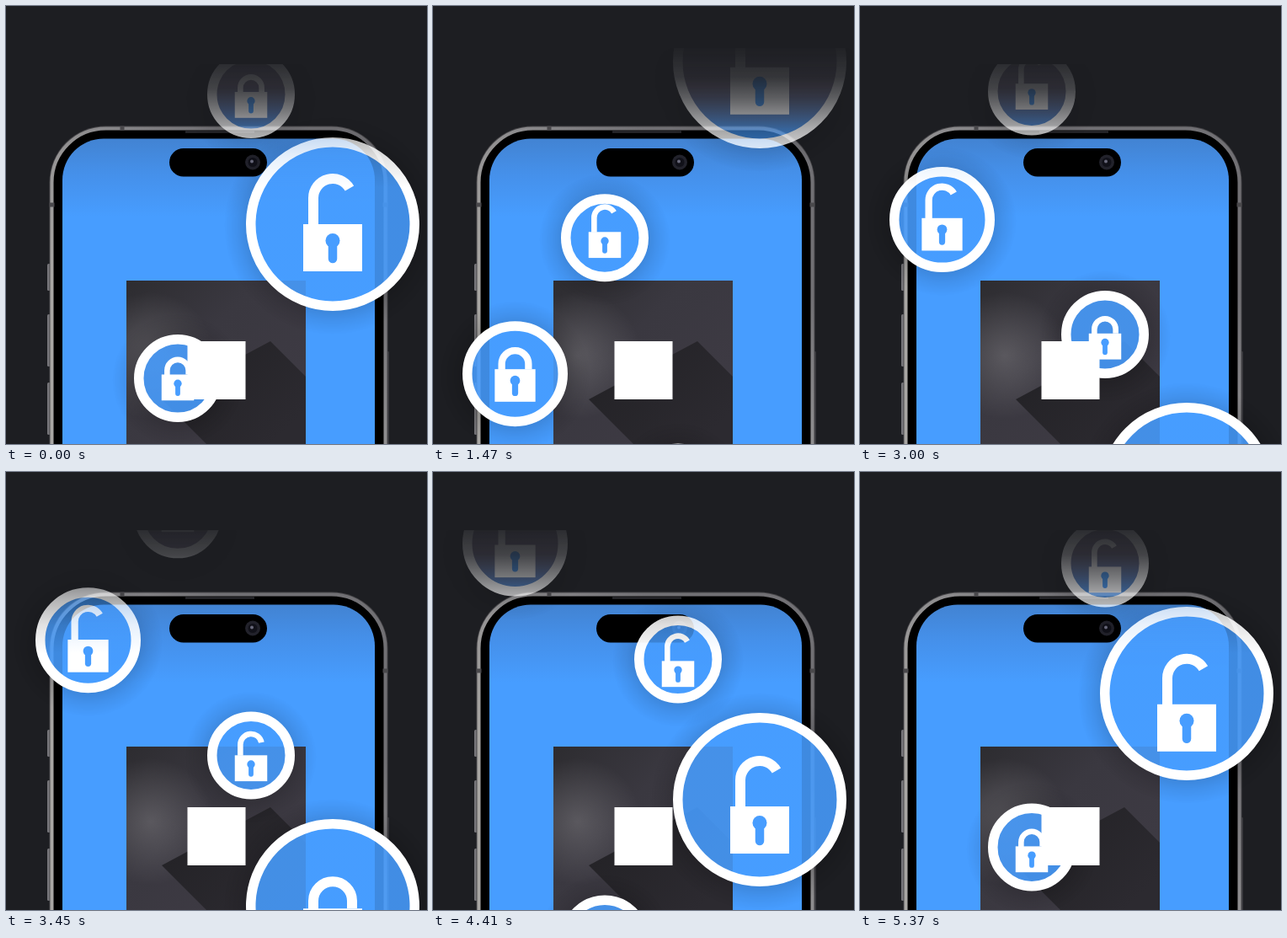
Recreate the animation shown at these times as an HTML page. Size 500 by 520 pixels, loop 5.4 s.

```html
<!DOCTYPE html>
<html lang="en">
<head>
<meta charset="utf-8">
<title>Floating locks</title>
<style>
  html, body { margin: 0; width: 100%; height: 100%; overflow: hidden; background: #1d1e22; }
  svg { display: block; width: 500px; height: 520px; }
</style>
</head>
<body>
<svg viewBox="0 0 500 520" xmlns="http://www.w3.org/2000/svg">
  <defs>
    <linearGradient id="screen" gradientUnits="userSpaceOnUse" x1="0" y1="157" x2="0" y2="250">
      <stop offset="0" stop-color="#4283d2"/>
      <stop offset=".45" stop-color="#4590ea"/>
      <stop offset="1" stop-color="#479dff"/>
    </linearGradient>
    <linearGradient id="metal" gradientUnits="userSpaceOnUse" x1="60" y1="330" x2="250" y2="142">
      <stop offset="0" stop-color="#a8a6a3"/>
      <stop offset=".6" stop-color="#8c8b8d"/>
      <stop offset="1" stop-color="#717074"/>
    </linearGradient>
    <linearGradient id="tile" gradientUnits="userSpaceOnUse" x1="143" y1="326" x2="300" y2="483">
      <stop offset="0" stop-color="#2d2c30"/>
      <stop offset=".5" stop-color="#3a3840"/>
      <stop offset="1" stop-color="#3d3a43"/>
    </linearGradient>
    <radialGradient id="glow" gradientUnits="userSpaceOnUse" cx="172" cy="415" r="75">
      <stop offset="0" stop-color="#77757a" stop-opacity=".55"/>
      <stop offset="1" stop-color="#77757a" stop-opacity="0"/>
    </radialGradient>
    <linearGradient id="cast" gradientUnits="userSpaceOnUse" x1="225" y1="420" x2="320" y2="515">
      <stop offset="0" stop-color="#242327"/>
      <stop offset="1" stop-color="#2c2a30"/>
    </linearGradient>
    <linearGradient id="glass" gradientUnits="userSpaceOnUse" x1="0" y1="95" x2="0" y2="150">
      <stop offset="0" stop-color="#857a98"/>
      <stop offset="1" stop-color="#479dff"/>
    </linearGradient>
    <linearGradient id="fadeHigh" gradientUnits="userSpaceOnUse" x1="0" y1="50" x2="0" y2="215">
      <stop offset="0" stop-color="#fff" stop-opacity=".02"/>
      <stop offset=".21" stop-color="#fff" stop-opacity=".11"/>
      <stop offset=".36" stop-color="#fff" stop-opacity=".29"/>
      <stop offset=".58" stop-color="#fff" stop-opacity=".64"/>
      <stop offset=".79" stop-color="#fff" stop-opacity=".88"/>
      <stop offset="1" stop-color="#fff"/>
    </linearGradient>
    <linearGradient id="fadeLow" gradientUnits="userSpaceOnUse" x1="0" y1="69" x2="0" y2="215">
      <stop offset="0" stop-color="#fff" stop-opacity=".07"/>
      <stop offset=".2" stop-color="#fff" stop-opacity=".17"/>
      <stop offset=".38" stop-color="#fff" stop-opacity=".4"/>
      <stop offset=".56" stop-color="#fff" stop-opacity=".66"/>
      <stop offset=".77" stop-color="#fff" stop-opacity=".87"/>
      <stop offset="1" stop-color="#fff"/>
    </linearGradient>
    <mask id="maskHigh" maskUnits="userSpaceOnUse" x="0" y="0" width="500" height="520">
      <rect y="50" width="500" height="470" fill="url(#fadeHigh)"/>
    </mask>
    <mask id="maskLow" maskUnits="userSpaceOnUse" x="0" y="0" width="500" height="520">
      <rect y="69" width="500" height="451" fill="url(#fadeLow)"/>
    </mask>
  </defs>

  <rect width="500" height="520" fill="#1d1e22"/>

  <!-- phone -->
  <g fill="#77767a">
    <rect x="49" y="306" width="4" height="32" rx="1.500"/>
    <rect x="49" y="366" width="4" height="62" rx="1.500"/>
    <rect x="49" y="447" width="4" height="62" rx="1.500"/>
    <rect x="452" y="410" width="3" height="120" rx="1" fill="#38383d"/>
  </g>
  <rect x="51.500" y="142.500" width="402" height="500" rx="67" fill="#4a494c"/>
  <rect x="54.500" y="145.500" width="396" height="496" rx="64" fill="#000" stroke="url(#metal)" stroke-width="4"/>
  <path d="M51.500 236h6M447.500 236h6M138 142.500v5" stroke="#4a494c" stroke-width="5"/>
  <path d="M213 149.500h82" stroke="#29292d" stroke-width="2.500"/>
  <rect x="67" y="157.500" width="371" height="480" rx="49" fill="url(#screen)"/>
  <rect x="194" y="169" width="116" height="33.500" rx="16.750" fill="#000"/>
  <circle cx="293" cy="185.500" r="9" fill="#22222b"/>
  <circle cx="293" cy="185.500" r="5.500" fill="#111119"/>
  <circle cx="292" cy="184.500" r="2" fill="#6a6a7c"/>

  <!-- app tile -->
  <rect x="143" y="326" width="213" height="200" fill="url(#tile)"/>
  <rect x="143" y="326" width="213" height="200" fill="url(#glow)"/>
  <path d="M185 467L314 398L356 440V520H238Z" fill="url(#cast)"/>

  <g id="bubbles"></g>

  <rect x="215.500" y="398" width="69" height="69" fill="#fff"/>
</svg>
<script>
const LOOP = 5400, STEP = 30, OPENING = 700, RING = 11.5;
const layer = document.getElementById('bubbles');

// y: centre at time 0; travel: rise per loop.
// leaving / arriving: lock drift [base, per ms] and opening time, before and after re-entry.
const bubbles = [
  { x: 97.5, r: 62.5, size: .69, y: 612.5, travel: 646, mask: 'maskLow',
    leaving: { drift: [-9, .0024], opens: 1750 } },
  { x: 204, r: 52, size: .55, y: 442, travel: 613, mask: 'maskLow',
    leaving: { drift: [-4.5, -.0016], opens: 500 },
    arriving: { drift: [-1, 0], opens: Infinity } },
  { x: 291, r: 52, size: .55, y: 105, travel: 641, mask: 'maskLow',
    leaving: { drift: [-3, 0], opens: Infinity },
    arriving: { drift: [-7.4, .0021], opens: 3000 } },
  { x: 388, r: 103, size: 1, y: 259, travel: 709, mask: 'maskHigh',
    leaving: { drift: [0, .0046], opens: -OPENING },
    arriving: { drift: [-14, .005], opens: 3600 } }
];

function add(parent, tag, attrs) {
  const node = document.createElementNS('http://www.w3.org/2000/svg', tag);
  set(node, attrs);
  return parent.appendChild(node);
}

function set(node, attrs) {
  for (const name in attrs) node.setAttribute(name, attrs[name]);
}

function build(b, index) {
  const group = add(layer, 'g', { mask: `url(#${b.mask})` });
  const reach = b.r + 26;
  const shade = add(group, 'radialGradient', { id: 'shade' + index });
  for (const [radius, opacity] of [[b.r - 6, 0], [b.r - 4, .15], [b.r + 10, .07], [reach, 0]])
    add(shade, 'stop', { offset: radius / reach, 'stop-color': '#000', 'stop-opacity': opacity });

  b.shadow = add(group, 'circle', { cx: b.x, r: reach, fill: `url(#shade${index})` });
  b.disc = add(group, 'circle', { cx: b.x, r: b.r - RING + 1, fill: 'url(#glass)', 'fill-opacity': .88 });
  b.ring = add(group, 'circle', { cx: b.x, r: b.r - RING / 2, fill: 'none', stroke: '#fff', 'stroke-width': RING });
  b.lock = add(group, 'g', {});
  b.shackle = add(b.lock, 'path', { fill: 'none', stroke: '#fff', 'stroke-width': 12 });
  add(b.lock, 'rect', { x: -35, width: 70, height: 56, fill: '#fff' });
  add(b.lock, 'circle', { cy: 19.5, r: 8.5, fill: '#479dff' });
  add(b.lock, 'path', { d: 'M0 20V41', stroke: '#479dff', 'stroke-width': 10.5, 'stroke-linecap': 'round' });
}

// The shackle rises while its free end retracts around the bend.
function shacklePath(open) {
  const radius = 23, bend = -9 - 22 * open, tail = 9 - 21 * open;
  const angle = Math.min(0, tail) / radius;
  const x = radius * Math.cos(angle), y = bend + radius * Math.sin(angle);
  const leg = tail > 0 ? `V${bend + tail}` : '';
  return `M${-radius} 1V${bend}A${radius} ${radius} 0 0 1 ${x} ${y}${leg}`;
}

function draw(t) {
  for (const b of bubbles) {
    let y = b.y - b.travel * t / LOOP;
    let phase = b.leaving;
    if (b.arriving && y < 45 - b.r) {
      y += b.travel;
      phase = b.arriving;
    }
    const open = Math.max(0, Math.min(1, (t - phase.opens) / OPENING));
    const lockY = y + phase.drift[0] + phase.drift[1] * t;
    set(b.shadow, { cy: y + 2 });
    set(b.disc, { cy: y });
    set(b.ring, { cy: y });
    set(b.lock, { transform: `translate(${b.x} ${lockY}) scale(${b.size})` });
    set(b.shackle, { d: shacklePath(open) });
  }
}

let start;
function frame(now) {
  start ??= now;
  draw(Math.floor((now - start) % LOOP / STEP) * STEP);
  requestAnimationFrame(frame);
}

bubbles.forEach(build);
draw(0);
requestAnimationFrame(frame);
</script>
</body>
</html>
```
